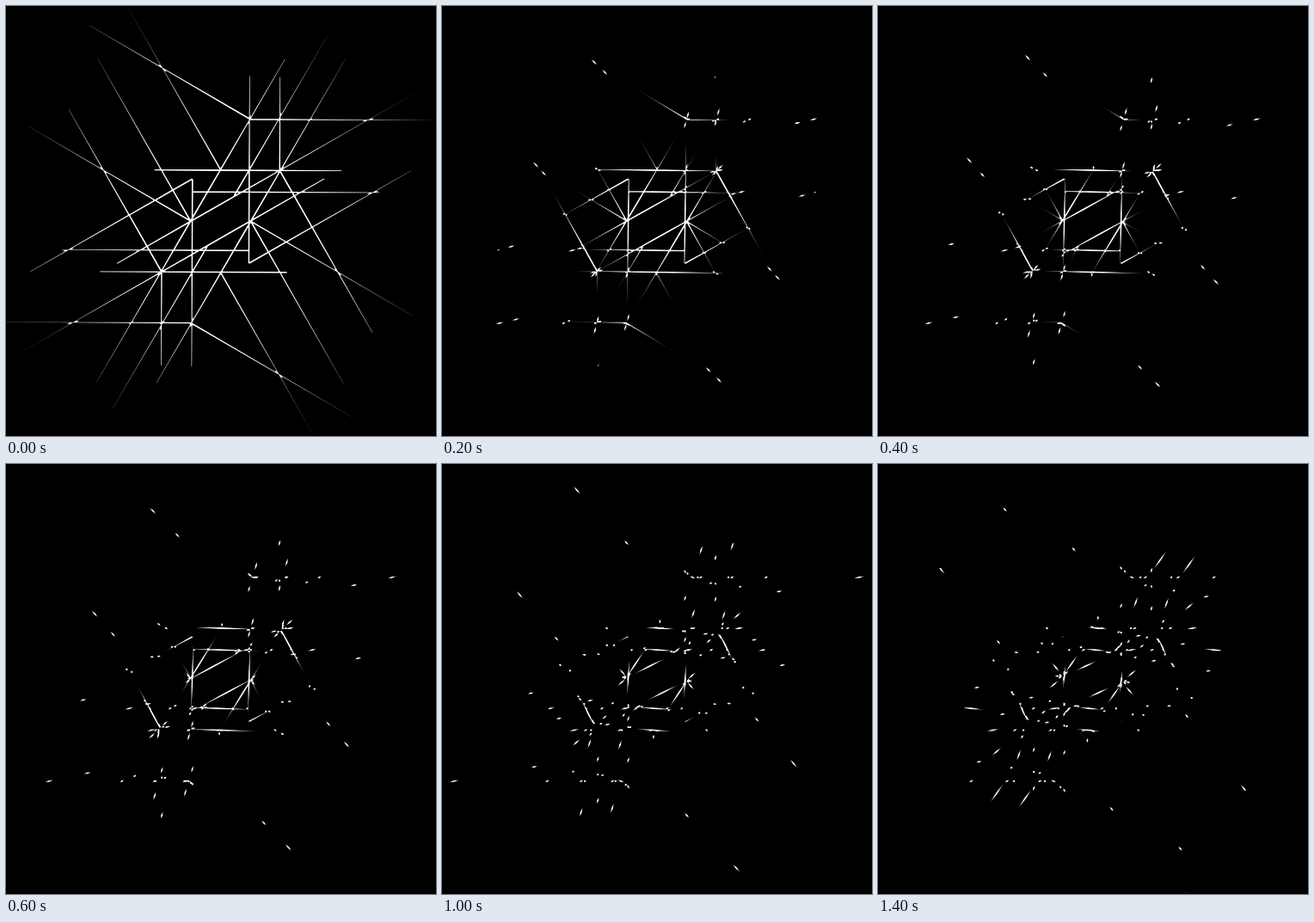
An HTML page with a canvas that plays this animation: 500 px wide and 500 px high, repeating every 1500 ms.

```html
<!DOCTYPE html>
<html lang="en">
<head>
<meta charset="utf-8">
<title>Crossing lines</title>
<style>
  html, body { margin: 0; width: 100%; height: 100%; overflow: hidden; background: #000; }
  canvas { display: block; width: 500px; height: 500px; }
</style>
</head>
<body>
<canvas id="stage" width="500" height="500"></canvas>
<script>
const ctx = document.getElementById('stage').getContext('2d');
const CX = 249.6, CY = 250.2;
const LENGTH = 218, STEP_MS = 100;
const U = 34.2, H = U * Math.sqrt(3);
const HUB = 35;

// Rotation in degrees for each step of the loop.
const ANGLES = [0.5, 1, 1.5, 2, 2.5, 3, 3.5, 4.5, 5.5, 6.2, 7, 7.7, 8.5, 9.5, 10.5];

// Half of the figure: start point from the centre, directions in degrees, length.
const RAYS = [
  [-HUB, 0, [-60]],
  [HUB, 0, [-60, 60, 30]],
  [2 * U, -H, [60, 150, -30]],
  [2 * U, -H, [-90], LENGTH / 2],
  [15.4, -29.3, [-60]],
  [-77.5, -H, [0]],
  [-33, -34, [0]],
  [U, -2 * H, [0, 210]],
  [33, -169, [90]],
  [33, 49, [-30]],
  [0, -H, [240]]
];

const rad = deg => deg * Math.PI / 180;

function buildFigure() {
  const path = new Path2D();
  for (const [x, y, dirs, len = LENGTH] of RAYS) {
    for (const dir of dirs) {
      const ex = x + len * Math.cos(rad(dir));
      const ey = y + len * Math.sin(rad(dir));
      for (const side of [1, -1]) {
        path.moveTo(side * x, side * y);
        path.lineTo(side * ex, side * ey);
      }
    }
  }
  return path;
}

const figure = buildFigure();

function strokeFigure(angle, mode) {
  ctx.save();
  ctx.globalCompositeOperation = mode;
  ctx.translate(CX, CY);
  ctx.rotate(rad(angle));
  ctx.stroke(figure);
  ctx.restore();
}

// Only the overlap of the still and the turned figure stays visible.
function draw(now) {
  const step = Math.floor(now / STEP_MS) % ANGLES.length;
  ctx.clearRect(0, 0, 500, 500);
  strokeFigure(0, 'source-over');
  strokeFigure(ANGLES[step], 'destination-in');
  requestAnimationFrame(draw);
}

ctx.strokeStyle = '#fff';
ctx.lineWidth = 2;
draw(0);
</script>
</body>
</html>
```
